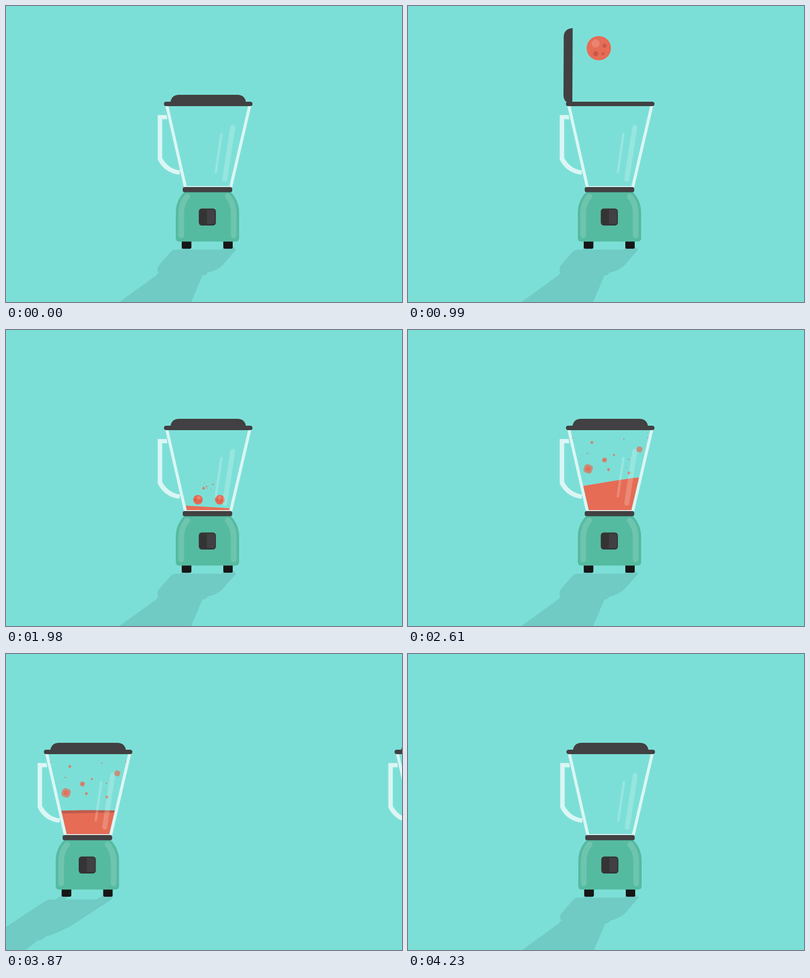
An HTML page that plays this animation: 800x600 px, repeating every 4350 ms.

```html
<!DOCTYPE html>
<html lang="en">
<head>
<meta charset="utf-8">
<title>Blender</title>
<style>
  html, body { margin: 0; width: 100%; height: 100%; overflow: hidden; background: #7cdfd7; }
  svg { display: block; width: 100vw; height: 100vh; }
  .dark { fill: #414042; }
  .shine { stroke: #fff; stroke-opacity: .2; stroke-linecap: round; fill: none; }
  .coral { fill: #e66c55; }
  .spot { fill: #c9584a; }
</style>
</head>
<body>
<svg viewBox="0 0 800 600">
  <defs>
    <path id="shade" fill="#70cbc5" d="M357 488H375L371 494H435L441 488H459L465 494
      Q450 511 438 525Q427 536 406 541Q406 546 397 546L353 650H160L305 545
      Q304 542 309 541Q304 537 307 528Q320 512 334 497Q337 494 342 494H352Z"/>
    <path id="lid" class="dark" d="M332 198V196Q334 180 350 180H467Q483 180 485 196V198Z"/>
    <path id="handle" fill="#fff" fill-opacity=".73"
      d="M324.5 221H306.5V311C315 329 331 340 350.5 342L352 333.5C336 332 323 322 315.5 308V229.5H326Z"/>
    <g id="shell">
      <g fill="none" stroke="#fff" stroke-opacity=".73">
        <path stroke-width="6" d="M324.7 201L362.6 368M492.7 201L453.8 368"/>
        <path stroke-width="2" d="M365.5 366H451"/>
      </g>
      <path class="shine" stroke-width="10" d="M458 246L442 351"/>
      <path class="shine" stroke-width="5" d="M435 260L424 337"/>
      <rect class="dark" x="319" y="194" width="179" height="9" rx="4.5"/>
      <g fill="#161616">
        <rect x="355" y="472" width="19.5" height="20" rx="3"/>
        <rect x="439" y="472" width="19" height="20" rx="3"/>
      </g>
      <path fill="#55bba0" d="M361 376H453Q471 394 471 419V470Q471 477.500 464 477.500H350Q343 477.500 343 470V419Q343 394 361 376Z"/>
      <path class="shine" stroke-width="11.500" style="stroke-opacity:.15"
        d="M366 386Q354 400 354 421V465M448 386Q460 400 460 421V465"/>
      <rect class="dark" x="357" y="367" width="100" height="10.500" rx="4"/>
      <rect fill="#343435" x="389.500" y="410.500" width="34.500" height="34.500" rx="6"/>
      <path class="dark" d="M406 413H418Q422 413 422 417V438Q422 442 418 442H406Z"/>
    </g>
    <clipPath id="floor"><path d="M300 0H500V365.500H300Z"/></clipPath>
    <clipPath id="jar"><path d="M327.500 203H490L451 365.500H365.500Z"/></clipPath>
  </defs>

  <use id="shadeOut" href="#shade"/>
  <use id="shadeIn" href="#shade"/>
  <g id="out">
    <use href="#handle"/>
    <use id="flap" href="#lid"/>
    <g clip-path="url(#floor)">
      <g id="ball1">
        <circle class="coral" r="24.600"/>
        <circle cx="-6.500" cy="-9.500" r="8.300" fill="#fff" fill-opacity=".17"/>
        <circle class="spot" cx="11.500" cy="-5" r="3.900"/>
        <circle class="spot" cx="-6.500" cy="11" r="5.300"/>
        <circle class="spot" cx="8.300" cy="11.300" r="2.900"/>
      </g>
      <g id="ball2">
        <circle class="coral" r="24.600"/>
        <circle cx="-7" cy="-9" r="8.300" fill="#fff" fill-opacity=".17"/>
        <circle class="spot" cx="12" cy="-3" r="5.300"/>
        <circle class="spot" cx="-8" cy="10" r="3.900"/>
        <circle class="spot" cx="8" cy="12" r="2.900"/>
      </g>
    </g>
    <g id="drops"></g>
    <g clip-path="url(#jar)">
      <path id="back" fill="#bf5b4b"/>
      <path id="front" class="coral"/>
    </g>
    <use href="#shell"/>
  </g>
  <g id="in">
    <use href="#handle"/>
    <use href="#lid"/>
    <use href="#shell"/>
  </g>
</svg>
<script>
const LOOP = 4350, STEP = 30, LAST = 4230, GAP = 708.5;
const $ = id => document.getElementById(id);
const set = (id, transform) => $(id).setAttribute('transform', transform);
const ramp = (t, a, b) => Math.min(1, Math.max(0, (t - a) / (b - a)));
const smooth = (t, a, b) => { const p = ramp(t, a, b); return p * p * (3 - 2 * p); };
const mix = (a, b, p) => a + (b - a) * p;

// x, y, radius
const drops = [
  [371.5, 228, 3], [436, 221, 1.3], [485, 218.5, 1.2], [332, 219, 1.2], [362.5, 250, 1.3],
  [348, 261, .8], [397, 263.5, 5], [416, 253.3, 2], [445.5, 262, 1.4], [467.5, 242, 6],
  [364, 281.5, 9.5], [405, 283, 3], [446.5, 290, 3], [441, 278.5, .8], [411, 268, .5], [415, 286, .5]
];

function addNode(parent, name, attrs) {
  const node = document.createElementNS('http://www.w3.org/2000/svg', name);
  for (const key in attrs) node.setAttribute(key, attrs[key]);
  return parent.appendChild(node);
}

function blob(parent, r, opacity) {
  addNode(parent, 'rect', {
    class: 'coral', 'fill-opacity': opacity, transform: 'rotate(20)',
    x: -r * .93, y: -r * .93, width: r * 1.86, height: r * 1.86, rx: r * .65
  });
}

const dropNodes = drops.map(([, , r]) => {
  const g = addNode($('drops'), 'g', {});
  blob(g, r, r < 2.5 ? .9 : .7);
  if (r > 2.5 && r !== 6) blob(g, r * .5, r > 4 ? .9 : .4);
  return g;
});

function lidAngle(t) {
  const s = Math.max(0, t - 90), w = .00566, k = .965;
  const swing = 1 - Math.exp(-k * w * s) * (Math.cos(w * s) + k * Math.sin(w * s));
  return -89.4 * swing * (1 - ramp(t, 1380, 1880) ** 2);
}

// Fall, then two shrinking hops against the wall on the given side
function moveBall(id, x, t, side, turn) {
  const land = 578, rest = 344;
  let y = rest, dx = 0;
  if (t < land) {
    y = -25 + (.0124 * Math.max(0, t)) ** 3;
  } else {
    const hop = Math.sin(Math.PI * ramp(t, land, land + 180));
    y = rest - 54 * hop - 10 * Math.sin(Math.PI * ramp(t, land + 180, land + 270));
    dx = side * 10 * hop;
  }
  const angle = turn * smooth(t, land, land + 270);
  return (shake, size) => set(id,
    `translate(${x + dx + shake} ${y}) rotate(${angle}) scale(${size})`);
}

function surface(id, height) {
  let d = 'M320 370';
  for (let x = 320; x <= 500; x += 6) d += `L${x} ${height(x).toFixed(2)}`;
  $(id).setAttribute('d', d + 'V370Z');
}

function drawLiquid(t) {
  const calm = smooth(t, 2820, 3400);
  const mean = mix(375, mix(309.5, 322.6, calm), smooth(t, 1900, 2160));
  const amp = mix(13.5, 1.6, calm) * ramp(t, 1900, 2100);
  const phase = -.5 + (Math.min(t, 3410) - 2610) * Math.PI / 200;
  const front = x => mean - amp * Math.sin(phase + (x - 354) * .0125);
  surface('front', front);
  surface('back', x => mix(front(x) + 3, 317.4 - .9 * Math.sin((x - 358) * .028), calm));
}

function drawDrops(t) {
  dropNodes.forEach((node, i) => {
    const [x, y] = drops[i];
    const p = ramp(t, 1950, 2580);
    const go = 1 - (1 - p) ** 4;
    const lift = .1 * Math.sin(Math.PI * p) * (330 - y);
    node.setAttribute('transform',
      `translate(${mix(407, x, go)} ${mix(330, y, go) - lift}) scale(${ramp(t, 1950, 2050)})`);
  });
}

// Shadow leans away from a fixed lamp as the unit moves sideways
function place(unit, shade, x) {
  const lean = .00643 * x, len = Math.exp(-.00193 * x), foot = 488;
  set(unit, `translate(${x})`);
  set(shade, `matrix(1 0 ${lean} ${len} ${x - lean * foot} ${foot * (1 - len)})`);
}

function draw(t) {
  set('flap', `rotate(${lidAngle(t)} 332 198)`);
  const size = 1 - smooth(t, 1900, 2040);
  const shake = t > 1900 ? 3 * Math.sin(t * .09) : 0;
  moveBall('ball1', 385.5, t - 603, -1, 55)(shake, size);
  moveBall('ball2', 434.2, t - 937, 1, 40)(-shake, size);
  drawLiquid(t);
  drawDrops(t);
  const d = t - 3899;
  const slide = GAP / (1 + Math.exp(-d * (d < 0 ? .0225 : .0198)));
  place('out', 'shadeOut', -slide);
  place('in', 'shadeIn', GAP - slide);
}

const start = performance.now();
function tick() {
  const now = Math.max(0, performance.now() - start) % LOOP;
  draw(now < 90 ? 0 : Math.min(LAST, Math.floor(now / STEP) * STEP));
  requestAnimationFrame(tick);
}
tick();
</script>
</body>
</html>
```
